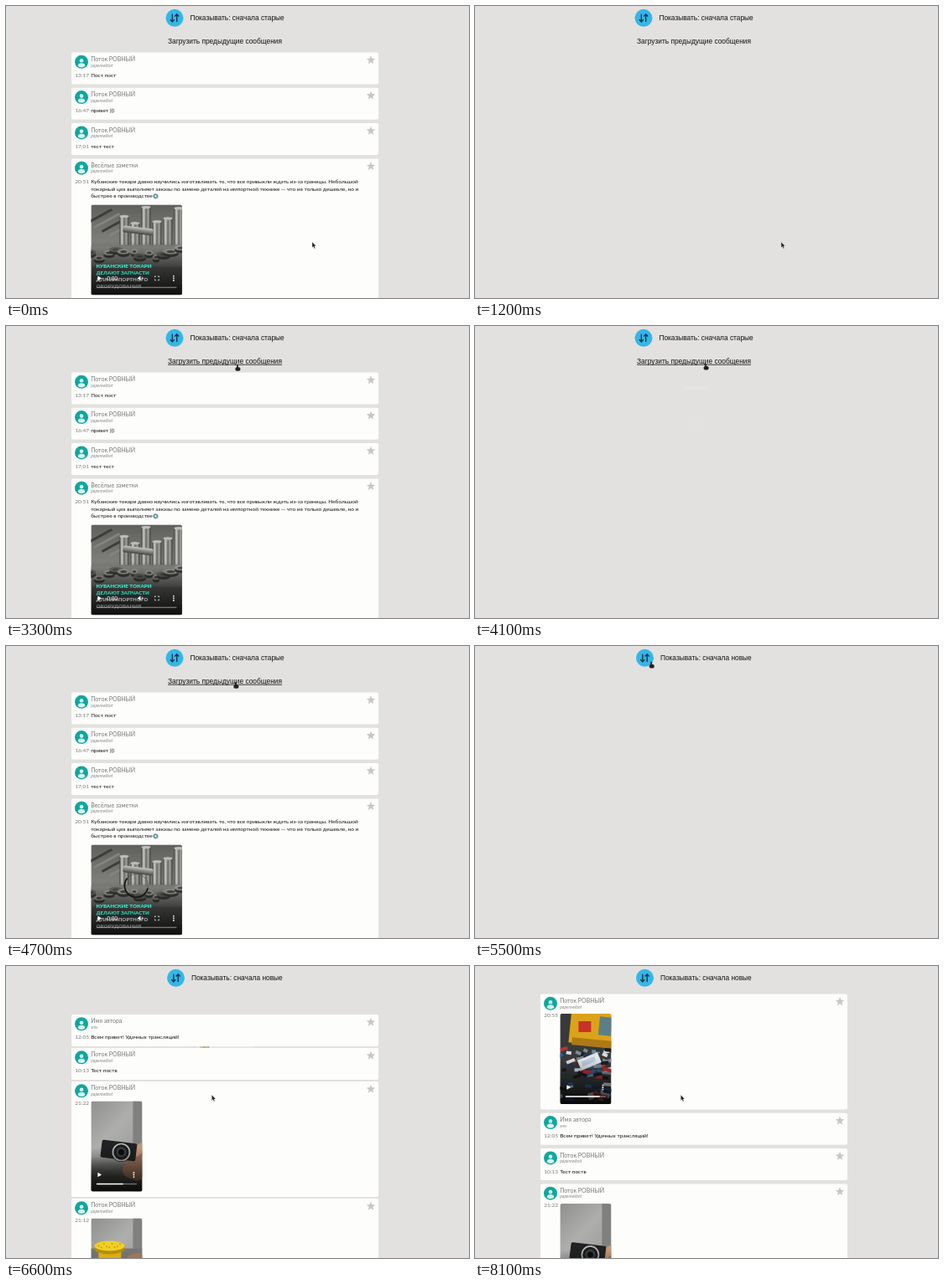
An HTML page with a canvas that plays this animation: 552 px wide and 349 px high, repeating every 8.6 s.

```html
<!DOCTYPE html>
<html lang="ru">
<head>
<meta charset="utf-8">
<style>
html, body { margin: 0; width: 100%; height: 100%; overflow: hidden; background: #e2e1e0; }
canvas { display: block; }
</style>
</head>
<body>
<canvas id="stage" width="552" height="349"></canvas>
<script>
const ctx = document.getElementById('stage').getContext('2d');
const LOOP = 8600, STEP = 100, LEFT = 78, WIDTH = 366, TOP = 55.5, GAP = 4.3;
const SANS = '"Liberation Sans", Arial, sans-serif';
const LATO = 'Lato, "Open Sans", sans-serif';
const HEAD = '8.35px ' + SANS, NAME = '7px ' + LATO, BODY = '6.5px ' + LATO;

const clamp = v => Math.max(0, Math.min(1, v));
const mix = (a, b, p) => a + (b - a) * p;
const phase = (t, start, length) => clamp((t - start) / length);
const smooth = p => p * p * (3 - 2 * p);

function random(seed) {
  return () => (seed = seed * 16807 % 2147483647) / 2147483647;
}

// Drawing helpers
function text(str, x, y, font, color) {
  ctx.font = font;
  ctx.fillStyle = color;
  ctx.fillText(str, x, y);
}
function rect(x, y, w, h, color) {
  ctx.fillStyle = color;
  ctx.fillRect(x, y, w, h);
}
function round(x, y, w, h, r, color) {
  ctx.fillStyle = color;
  ctx.beginPath();
  ctx.roundRect(x, y, w, h, r);
  ctx.fill();
}
function oval(x, y, rx, ry, color) {
  ctx.fillStyle = color;
  ctx.beginPath();
  ctx.ellipse(x, y, rx, ry, 0, 0, Math.PI * 2);
  ctx.fill();
}
const disc = (x, y, r, color) => oval(x, y, r, r, color);
function ring(x, y, r, color, width, from = 0, to = Math.PI * 2) {
  ctx.beginPath();
  ctx.arc(x, y, r, from, to);
  ctx.strokeStyle = color;
  ctx.lineWidth = width;
  ctx.stroke();
}
// A block turned about its centre
function tilted(x, y, w, h, angle, color, r = 0) {
  ctx.save();
  ctx.translate(x, y);
  ctx.rotate(angle);
  round(-w / 2, -h / 2, w, h, r, color);
  ctx.restore();
}
function shape(pts, color) {
  ctx.beginPath();
  pts.forEach(p => ctx.lineTo(...p));
  ctx.closePath();
  ctx.fillStyle = color;
  ctx.fill();
}
function gradient(x0, y0, x1, y1, ...colors) {
  const g = ctx.createLinearGradient(x0, y0, x1, y1);
  colors.forEach((c, i) => g.addColorStop(i / (colors.length - 1), c));
  return g;
}

// Card parts
function avatar(x, y) {
  ctx.save();
  disc(x, y, 8, '#10a79d');
  ctx.beginPath();
  ctx.arc(x, y, 6.6, 0, Math.PI * 2);
  ctx.clip();
  disc(x, y - 1.6, 2.3, '#d8f3f0');
  oval(x, y + 4.4, 4.2, 3, '#d8f3f0');
  ctx.restore();
}
function star(x, y) {
  const pts = [];
  for (let i = 0; i < 10; i++) {
    const a = (i / 5 - 0.5) * Math.PI, r = i % 2 ? 2.4 : 5.5;
    pts.push([x + r * Math.cos(a), y + r * Math.sin(a)]);
  }
  shape(pts, '#c6c6c5');
}
function gear(x, y) {
  for (let a = 0; a < 6; a += Math.PI / 4)
    disc(x + 2.6 * Math.cos(a), y + 2.6 * Math.sin(a), 0.7, '#4c8f9d');
  ring(x, y, 1.9, '#4c8f9d', 1.3);
}
function controls(w, share, wide) {
  const y = 88, bar = w - 13;
  shape([[8, y - 2.8], [8, y + 2.8], [12.6, y]], '#fff');
  for (let i = -1; i < 2; i++) disc(w - 10, y + i * 2.6, 0.9, '#fff');
  rect(6.5, y + 10.3, bar, 1.4, 'rgba(255,255,255,.4)');
  rect(6.5, y + 10.3, bar * share, 1.4, '#fff');
  if (!wide) return;
  text('0:00', 19, y + 2.4, '6.5px ' + SANS, '#fff');
  shape([[55.5, y], [59, y - 2.8], [59, y + 2.8]], '#fff');
  ring(59.5, y, 2, '#fff', 0.8, -1, 1);
  ctx.setLineDash([2.4, 2.4]);
  ctx.lineDashOffset = 1.2;
  ctx.lineWidth = 0.9;
  ctx.strokeStyle = '#fff';
  ctx.strokeRect(76.1, y - 2.4, 4.8, 4.8);
  ctx.setLineDash([]);
}

// Video stills, drawn from the top left corner of the player
function pipe(x, y, w, h) {
  rect(x, y, w, h, gradient(x, 0, x + w, 0, '#3f403d', '#cfd0cc', '#6a6b67', '#a2a39f', '#363734'));
  oval(x + w / 2, y, w / 2, 1.7, '#bcbdb8');
}
function workshop(t) {
  rect(0, 0, 109, 108, gradient(0, 0, 0, 108, '#5f605b', '#858681', '#6a6b66'));
  for (let i = 0; i < 4; i++) tilted(10 + i * 9, 14 + i * 5, 34, 3, -0.5, i % 2 ? '#83847e' : '#3d3e3a');
  rect(0, 50, 109, 24, '#8d8e89');
  for (let i = 0; i < 6; i++) {
    const y = 14 + 11 * Math.sin(i * 2.3);
    pipe(34 + i * 13, y, 11, 48 - y);
  }
  tilted(56, 31, 36, 8, 0.12, gradient(0, -4, 0, 4, '#c6c7c3', '#43443f'), 2);
  const rnd = random(11);
  for (let i = 0; i < 12; i++) {
    const x = i * 9.5 + rnd() * 5, y = 50 + rnd() * 16, r = 4 + rnd() * 6;
    oval(x, y + 3, r, 3.4, '#3f403c');
    oval(x, y, r, 3.2, i % 3 ? '#a5a6a1' : '#6d6e69');
    oval(x, y, r * 0.5, 1.5, '#51524d');
  }
  rect(0, 44, 109, 64, gradient(0, 44, 0, 108, 'rgba(10,10,10,0)', 'rgba(10,10,10,.62)', 'rgba(10,10,10,.95)'));
  ['КУБАНСКИЕ ТОКАРИ', 'ДЕЛАЮТ ЗАПЧАСТИ', 'ДЛЯ ИМПОРТНОГО', 'ОБОРУДОВАНИЯ'].forEach((s, i) =>
    text(s, 6, 75.3 + i * 8, '900 6.2px ' + LATO, ['#35e8ca', '#2ccdb3', '#a3a5a3', '#686b69'][i]));
  controls(108.5, 0, true);
  if ((t > 1400 && t < 2400) || t > 4000) {
    const a = t / 260 + 1;
    ring(54, 49, 14, 'rgba(70,70,70,.4)', 1.5);
    ring(54, 49, 14, '#151515', 1.8, a, a + 3.6);
  }
}
function wall() {
  rect(0, 0, 61, 108, gradient(0, 0, 61, 60, '#8f8f8d', '#aeaeac', '#9b9b99'));
  rect(50, 0, 11, 108, '#80817f');
}
function shade(share) {
  rect(0, 55, 61, 53, gradient(0, 55, 0, 108, 'rgba(0,0,0,0)', 'rgba(0,0,0,.85)'));
  controls(61, share);
}
function camera() {
  wall();
  rect(0, 66, 61, 42, gradient(0, 66, 0, 90, 'rgba(60,60,60,0)', '#4c4c4a'));
  tilted(54, 76, 26, 36, 0.4, '#a0755c', 8);
  tilted(57, 58, 20, 11, -0.6, '#c3967a', 5);
  tilted(33, 59, 42, 21, 0.12, '#202122', 2);
  disc(36, 61, 11.5, '#1b1c1d');
  ring(36, 61, 10, '#b9bab8', 1.7);
  disc(36, 61, 6.3, '#393b3e');
  disc(36, 61, 3.5, '#0c0d0f');
  shade(0.66);
}
function cup() {
  wall();
  rect(0, 36, 61, 72, gradient(0, 36, 0, 108, '#777875', '#4b4b48'));
  round(9, 34, 27, 48, 4, '#d9ad14');
  oval(22, 36, 18, 7, '#b78d0d');
  oval(22, 33, 18, 6, '#efd024');
  for (let i = 0; i < 9; i++) disc(9 + i * 3.2, 33 + 2.5 * Math.sin(i * 2.2), 1, '#c69e12');
  tilted(54, 54, 20, 24, -0.3, '#a2745d', 6);
  shade(0.3);
}
function bricks() {
  rect(0, 0, 61, 108, '#38393a');
  tilted(38, 16, 52, 42, 0.1, '#dba319');
  tilted(38, 35, 48, 9, 0.1, '#ad7a16');
  rect(22, 9, 15, 13, '#c9302a');
  tilted(54, 15, 15, 22, 0.1, '#5c7f87');
  const colors = ['#d8dade', '#2d5f9a', '#b33430', '#1b1c1f', '#7d8992', '#263a50'];
  const rnd = random(7);
  for (let i = 0; i < 80; i++)
    tilted(rnd() * 61, 42 + rnd() * 62, 4 + rnd() * 8, 4, rnd() - 0.5, colors[i % 6]);
  tilted(35, 57, 26, 13, -0.4, '#dfe5eb');
  tilted(34, 57, 17, 6, -0.4, '#b9c9d8');
  shade(0.85);
}
function player(x, y, w, paint, t) {
  ctx.save();
  ctx.translate(x, y);
  ctx.beginPath();
  ctx.roundRect(0, 0, w, 108, 2.5);
  ctx.clip();
  paint(t);
  ctx.restore();
}

// Messages
const FEED = 'Поток РОВНЫЙ', BOT = 'paperowlbot';
const note = (time, body, name = FEED, sub = BOT) => ({ time, name, sub, lines: [body], h: 38 });
const clip = (time, paint) => ({ time, name: FEED, sub: BOT, lines: [], h: 138, paint, top: 23.5, w: 61 });

const oldest = [
  note('13:17', 'Пост пост'),
  note('16:47', 'привет )))'),
  note('17:01', 'тест тест'),
  {
    time: '20:51', name: 'Весёлые заметки', sub: BOT, h: 170, paint: workshop, top: 55, w: 108.5,
    lines: [
      'Кубанские токари давно научились изготавливать то, что все привыкли ждать из-за границы. Небольшой',
      'токарный цех выполняет заказы по замене деталей на импортной технике — что не только дешевле, но и',
      'быстрее в производстве'
    ]
  }
];
const newest = [
  note('12:05', 'Всем привет! Удачных трансляций!', 'Имя автора', 'sms'),
  note('10:13', 'Тест поств'),
  clip('21:22', camera),
  clip('21:12', cup)
];
const arrival = clip('20:55', bricks);

function card(item, y, scale, t) {
  if (scale <= 0 || y > 349) return;
  const { name, sub, time, lines, h } = item;
  ctx.save();
  ctx.globalAlpha = scale;
  ctx.translate(LEFT + WIDTH / 2, y + h / 2);
  ctx.scale(scale, scale);
  ctx.translate(-WIDTH / 2, -h / 2);
  round(0, 0, WIDTH, h, 2, '#fdfdfc');
  avatar(12, 11.3);
  star(357, 9.2);
  text(name, 23.2, 10.4, NAME, '#777');
  text(sub, 23.2, 17, 'italic 5px ' + LATO, '#888');
  text(time, 4.3, lines.length ? 29.4 : 27.8, BODY, '#777');
  lines.forEach((s, i) => text(s, 23.2, 29.4 + i * 8.8, BODY, '#111'));
  if (lines.length > 1) gear(23.2 + ctx.measureText(lines.at(-1)).width + 3.8, 44.8);
  if (item.paint) player(23.4, item.top, item.w, item.paint, t);
  ctx.restore();
}
function stack(items, y, paint) {
  items.forEach((item, i) => {
    paint(item, y, i);
    y += item.h + GAP;
  });
}

// Cards grow in one after another and leave together
const grow = (t, start, i = 0) => phase(t, start + 22 * i, 500);
const leave = (t, start) => 1 - phase(t, start, 300);

function oldScale(t, i) {
  if (t < 1440) return leave(t, 900);
  if (t < 4050) return Math.min(grow(t, 1440, i), leave(t, 3750));
  return Math.min(grow(t, 4050, i), leave(t, 5200));
}

function arrow(x, y, dir) {
  const tip = y + 4.6 * dir;
  ctx.beginPath();
  ctx.moveTo(x, y - 4.6 * dir);
  ctx.lineTo(x, tip);
  ctx.moveTo(x - 2.5, tip - 2.8 * dir);
  ctx.lineTo(x, tip);
  ctx.lineTo(x + 2.5, tip - 2.8 * dir);
  ctx.strokeStyle = '#17384a';
  ctx.lineWidth = 1.4;
  ctx.stroke();
}
function header(fresh, hover) {
  const x = fresh ? 202.5 : 201;
  disc(x, 14.3, 10.5, '#35b6e8');
  arrow(x - 2.7, 14.3, 1);
  arrow(x + 2.7, 14.3, -1);
  text('Показывать: сначала ' + (fresh ? 'новые' : 'старые'), x + 18.4, 17.2, HEAD, '#111');
  if (fresh) return;
  const link = 'Загрузить предыдущие сообщения';
  text(link, 193, 44.7, HEAD, '#111');
  if (hover) rect(193, 45.8, ctx.measureText(link).width, 0.8, '#111');
}

function pointerAt(t) {
  let spot = [365, 282];
  const glide = (x, y, start, length) => {
    const p = smooth(phase(t, start, length));
    spot = [mix(spot[0], x, p), mix(spot[1], y, p)];
  };
  glide(276, 46, 2750, 450);
  glide(274, 43, 3800, 700);
  glide(204, 15, 4700, 450);
  glide(265, 50.5, 5400, 500);
  glide(245.3, 154, 5900, 600);
  return spot;
}
function pointer(x, y, hand) {
  ctx.save();
  ctx.translate(x, y);
  if (hand) {
    round(-1, 0, 1.8, 5, 0.9, '#222');
    round(-2.6, 3.2, 6, 4.6, 1.8, '#222');
  } else {
    const pts = [[0, 0], [0, 6.8], [1.5, 5.5], [2.6, 8], [3.7, 7.5], [2.7, 5.1], [4.7, 4.9]];
    shape(pts, '#222');
    ctx.strokeStyle = 'rgba(255,255,255,.6)';
    ctx.lineWidth = 0.5;
    ctx.stroke();
  }
  ctx.restore();
}

function draw(t) {
  rect(0, 0, 552, 349, '#e2e1e0');
  const fresh = t >= 5300;
  const [x, y] = pointerAt(t);
  const onLink = !fresh && x > 192 && x < 330 && y > 36 && y < 48;
  const onButton = Math.hypot(x - 202, y - 14) < 11;

  header(fresh, onLink);
  if (t < 5500) {
    stack(oldest, TOP, (item, top, i) => card(item, top, oldScale(t, i), t));
  } else {
    // The list rises in turn, then makes room for a new message
    card(arrival, TOP - 22, grow(t, 6506), t);
    stack(newest, TOP - 22, (item, top, i) => {
      const rise = 400 * (1 - phase(t, 5536 + 94 * i, 400)) ** 1.6;
      const push = (arrival.h + GAP) * phase(t, 6514 + 8 * i, 500);
      card(item, top + rise + push, 1, t);
    });
  }
  pointer(x, y, onLink || onButton);
}

function tick() {
  const t = performance.now() % LOOP;
  draw(Math.floor(t / STEP) * STEP);
  requestAnimationFrame(tick);
}
tick();
</script>
</body>
</html>
```
